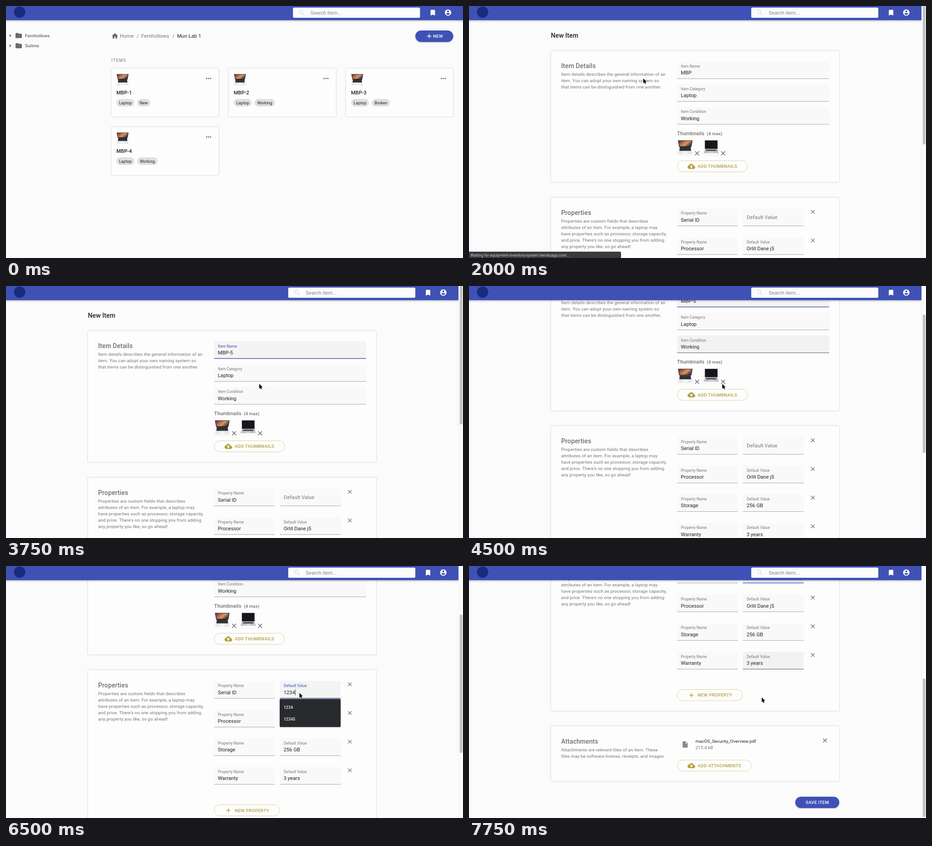
An HTML page that plays this animation: 1007 px wide and 556 px high, repeating every 8 s.

```html
<!DOCTYPE html>
<html lang="en">
<head>
<meta charset="utf-8">
<title>Equipment inventory</title>
<style>
html, body { margin: 0; width: 100%; height: 100%; overflow: hidden; background: #fbfbfb; }
svg { display: block; width: 1007px; height: 556px; font-family: Roboto, Arial, sans-serif; }
text { white-space: pre; }
.card { fill: #fdfdfd; filter: drop-shadow(0 .8px .8px rgba(0,0,0,.3)); }
.raised { fill: #3f51b5; filter: drop-shadow(0 1.2px 1.2px rgba(0,0,0,.3)); }
.bar { fill: #3f51b5; filter: drop-shadow(0 1.5px 2px rgba(0,0,0,.3)); }
.thumb { fill: #fff; filter: drop-shadow(0 .4px .7px rgba(0,0,0,.3)); }
</style>
</head>
<body>
<svg id="stage" viewBox="0 0 1007 556">
  <defs>
    <linearGradient id="dusk" x2="1" y2=".5">
      <stop offset="0" stop-color="#47374f"/><stop offset=".4" stop-color="#c4664a"/>
      <stop offset=".65" stop-color="#d99a56"/><stop offset="1" stop-color="#4a3a58"/>
    </linearGradient>
    <linearGradient id="sky" x2="1" y2="1">
      <stop offset="0" stop-color="#0b4fc0"/><stop offset=".55" stop-color="#2f8fee"/>
      <stop offset="1" stop-color="#0a3fa6"/>
    </linearGradient>
    <clipPath id="view"><rect y="31" width="997" height="525"/></clipPath>
  </defs>
  <g id="page"></g>
  <g id="header"></g>
  <g id="overlay"></g>
</svg>
<script>
const BLUE = '#3f51b5', GREY = '#757575', INK = '#212121', GOLD = '#b39f3e', ICON = '#666';
const LOOP = 8000, STEP = 250;

const ICONS = {
  bookmark: 'M17 3H7c-1.1 0-1.99.9-1.99 2L5 21l7-3 7 3V5c0-1.1-.9-2-2-2z',
  account: 'M12 2C6.48 2 2 6.48 2 12s4.48 10 10 10 10-4.48 10-10S17.52 2 12 2zm0 3c1.66 0 3 1.34 3 3s-1.34 3-3 3-3-1.34-3-3 1.34-3 3-3zm0 14.2c-2.5 0-4.71-1.28-6-3.22.03-1.99 4-3.08 6-3.08 1.99 0 5.97 1.09 6 3.08-1.29 1.94-3.5 3.22-6 3.22z',
  home: 'M10 20v-6h4v6h5v-8h3L12 3 2 12h3v8z',
  folder: 'M10 4H4c-1.1 0-1.99.9-1.99 2L2 18c0 1.1.9 2 2 2h16c1.1 0 2-.9 2-2V8c0-1.1-.9-2-2-2h-8l-2-2z',
  caret: 'M10 17l5-5-5-5v10z',
  add: 'M19 13h-6v6h-2v-6H5v-2h6V5h2v6h6v2z',
  addCircle: 'M13 7h-2v4H7v2h4v4h2v-4h4v-2h-4V7zm-1-5C6.48 2 2 6.48 2 12s4.48 10 10 10 10-4.48 10-10S17.52 2 12 2zm0 18c-4.41 0-8-3.59-8-8s3.59-8 8-8 8 3.59 8 8-3.59 8-8 8z',
  cloud: 'M19.35 10.04C18.67 6.59 15.64 4 12 4 9.11 4 6.6 5.64 5.35 8.04 2.34 8.36 0 10.91 0 14c0 3.31 2.69 6 6 6h13c2.76 0 5-2.24 5-5 0-2.64-2.05-4.78-4.65-4.96zM14 13v4h-4v-4H7l5-5 5 5h-3z',
  close: 'M19 6.41L17.59 5 12 10.59 6.41 5 5 6.41 10.59 12 5 17.59 6.41 19 12 13.41 17.59 19 19 17.59 13.41 12z',
  more: 'M6 10a2 2 0 100 4 2 2 0 000-4zm6 0a2 2 0 100 4 2 2 0 000-4zm6 0a2 2 0 100 4 2 2 0 000-4z',
  file: 'M6 2c-1.1 0-1.99.9-1.99 2L4 20c0 1.1.89 2 1.99 2H18c1.1 0 2-.9 2-2V8l-6-6H6zm7 7V3.5L18.5 9H13z',
  search: 'M15.5 14h-.79l-.28-.27C15.41 12.59 16 11.11 16 9.5 16 5.91 13.09 3 9.5 3S3 5.91 3 9.5 5.91 16 9.5 16c1.61 0 3.09-.59 4.23-1.57l.27.28v.79l5 4.99L20.49 19l-4.99-5zm-6 0C7.01 14 5 11.99 5 9.5S7.01 5 9.5 5 14 7.01 14 9.5 11.99 14 9.5 14z'
};

const rect = (x, y, w, h, attrs = '') => `<rect x="${x}" y="${y}" width="${w}" height="${h}" ${attrs}/>`;
const icon = (name, cx, cy, fill = ICON, k = 0.7) =>
  `<path d="${ICONS[name]}" fill="${fill}" transform="translate(${cx - 12 * k} ${cy - 12 * k}) scale(${k})"/>`;
const text = (s, x, y, size, fill = INK, { w = 400, ls = 0, mid = false } = {}) =>
  `<text x="${x}" y="${y}" font-size="${size}" fill="${fill}" font-weight="${w}" letter-spacing="${ls}"` +
  `${mid ? ' text-anchor="middle"' : ''}>${s}</text>`;
const card = (x, y, w, h) => rect(x, y, w, h, 'rx="2.8" class="card"');
const lines = (list, x, y, gap, ls) => list.map((s, i) => text(s, x, y + i * gap, 9.8, GREY, { ls })).join('');
const chip = (s, x, y, w) =>
  rect(x, y, w, 16.8, 'rx="8.4" fill="#e0e0e0"') + text(s, x + w / 2, y + 11.5, 9.1, INK, { mid: true });

function laptop(x, y, size, plain) {
  const screen = plain
    ? '<path d="M3 1.5H31V20H3z" fill="#16171a"/><path d="M3 20H31L33.500 30H.5z" fill="#c3c4c6"/>' +
      '<path d="M6 21.500H28L29 25H5z" fill="#55565a"/><path d="M13 26H21L21.500 29H12.500z" fill="#d8d9da"/>'
    : '<path d="M1 1.500H33L30.500 16H3.500z" fill="#222127"/><path d="M2.500 2.500H31.500L29.500 14.500H4.500z" fill="url(#dusk)"/>' +
      '<path d="M4 16H30L32.500 32H1.500z" fill="#e6e6e8"/><path d="M5 16H29L29.800 24.500H4.200z" fill="#303136"/>' +
      '<path d="M11.500 26H22.500L23 31H11z" fill="#f4f4f5"/>';
  return `<g transform="translate(${x} ${y}) scale(${size / 34})">${rect(0, 0, 34, 34.5, 'rx="2.5" class="thumb"')}${screen}</g>`;
}

function desktop(x, y) {
  return `<g transform="translate(${x} ${y})">${rect(0, 0, 34.5, 34.5, 'rx="2.5" class="thumb"')}
    <path d="M1 2L11 1V28L1 26z" fill="#1d2025"/>
    <path d="M10 3L34 1V21L10 23z" fill="#15181d"/><path d="M11.500 4.200L32.800 2.500V19.500L11.500 21.300z" fill="url(#sky)"/>
    <path d="M19 22H25L26 26H18z" fill="#30343a"/><path d="M9 26L29 27L27 31L6 29z" fill="#c9ccd1"/>
    <ellipse cx="31" cy="29.500" rx="2" ry="1.300" fill="#34373c"/></g>`;
}

function itemCard(x, y, name, state, chipW) {
  return card(x, y, 236.5, 106) + laptop(x + 11.3, y + 11, 27.5) + icon('more', x + 214.5, y + 22) +
    text(name, x + 11.3, y + 57, 11.2, INK, { w: 500 }) +
    chip('Laptop', x + 11.3, y + 67, 39.5) + chip(state, x + 57, y + 67, chipW);
}

function listPage(st) {
  const places = ['Fernhollows', 'Sulime'].map((s, i) => {
    const y = 65.2 + i * 22.4;
    return icon('caret', 9.500, y, ICON) + icon('folder', 28, y, '#6a6a6a') +
      text(s, 42, y + 3.800, 9.8, '#666', { w: 500, ls: 0.1 });
  }).join('');
  const trail = [['Home', 251], ['/', 288], ['Fernhollows', 298], ['/', 367]]
    .map(([s, x]) => text(s, x, 70.2, 11.2, GREY, { ls: 0.1 })).join('');
  return places + icon('home', 240, 66.2) + trail + text('Mun Lab 1', 377, 70.2, 11.2, INK, { ls: 0.1 }) +
    rect(902, 54, 83.500, 25.2, `rx="12.6" class="raised"${st.hot ? ' style="fill:#303f9f"' : ''}`) +
    icon('add', 932.500, 66.5, '#fff') + text('NEW', 941, 70.1, 9.8, '#fff', { w: 500, ls: 0.28 }) +
    text('ITEMS', 232, 123.2, 9.5, GREY, { ls: 1.15 }) +
    itemCard(232, 138, 'MBP-1', 'New', 29) + itemCard(490.5, 138, 'MBP-2', 'Working', 45) +
    itemCard(749, 138, 'MBP-3', 'Broken', 40) + itemCard(232, 267, 'MBP-4', 'Working', 45);
}

function templatePage() {
  const bold = { w: 500 };
  return text('Choose template', 22, 70, 14, INK, { w: 500, ls: 0.1 }) +
    rect(22.5, 88.2, 223, 112.3, `rx="2.8" fill="none" stroke="${BLUE}" stroke-width="1.4" stroke-dasharray="4.2 2.8"`) +
    icon('addCircle', 133.7, 133, BLUE) + text('No Template', 133.7, 159, 11.2, BLUE, { mid: true, ls: 0.1 }) +
    card(268, 87.5, 224.5, 113.5) + laptop(280, 99, 34) +
    text('Mossbell Pad Tem...', 279.5, 151.6, 11.2, INK, bold) + chip('Laptop', 398, 139.500, 39.5) +
    lines(['The Mossbell Pad is a line of', 'Tolvamesh portable computers int...'], 279.5, 172.3, 12.8, 0) +
    card(514.5, 87.5, 224.5, 113.5) + desktop(526, 99) +
    text('PC Template', 526, 151.6, 11.2, INK, bold) + chip('Desktop', 602, 139.500, 45) +
    lines(['A personal computer (PC) is a', 'multi-purpose computer whose si...'], 526, 172.3, 12.8, 0);
}

// Filled text field; mode is '', 'hover' or 'focus'.
function field(label, value, x, y, w, mode) {
  const focus = mode === 'focus', hover = mode === 'hover';
  const fill = hover ? '#f2f2f2' : focus ? '#f4f4f4' : '#f9f9f9';
  const line = focus ? rect(x, y + 37.2, w, 1.4, `fill="${BLUE}"`)
    : rect(x, y + 37.8, w, 0.8, `fill="${hover ? '#333' : '#8f8f8f'}"`);
  const raised = value || focus;
  const tag = raised
    ? text(label, x + 8.5, y + 13.5, 8.4, focus ? BLUE : GREY, { ls: 0.08 })
    : text(label, x + 8.5, y + 22.7, 11.2, GREY, { ls: 0.1 });
  return `<path d="M${x} ${y + 38.5}V${y + 2.8}q0 -2.800 2.800 -2.800h${w - 5.6}q2.800 0 2.800 2.800V${y + 38.5}z" fill="${fill}"/>` +
    line + tag + text(value, x + 8.3, y + 28.9, 11.2);
}

const caret = (x, y) => rect(x, y, 0.8, 13.5, 'fill="#222"');

function outlined(s, y, w, glyph) {
  return rect(458.9, y, w, 24.6, `rx="12.3" fill="none" stroke="#d2c78d" stroke-width=".8"`) +
    icon(glyph, 490, y + 12.5, GOLD) + text(s, 504, y + 15.9, 9.8, GOLD, { w: 500, ls: 0.28 });
}

const ROWS = [['Serial ID', ''], ['Processor', 'Orlit Dane j5'], ['Storage', '256 GB'], ['Warranty', '3 years']];

function formPage(st) {
  const mode = id => st.focus === id ? 'focus' : st.hover === id ? 'hover' : '';
  const head = (s, y) => text(s, 203, y, 14, '#707070', { w: 500, ls: 0.1 });
  const rows = ROWS.map(([name, value], i) => {
    const y = 446.8 + i * 63.25;
    return field('Property Name', name, 458.5, y, 133.8, '') +
      field('Default Value', i ? value : st.serial, 603.5, y, 134, mode('value' + i)) +
      icon('close', 757.6, y + 7.200, ICON, 0.62);
  }).join('');
  const menu = st.menu ? rect(603, 486.2, 134.5, 62, 'rx="2.8" fill="#292a2d"') +
    ['1234', '12345'].map((s, i) => text(s, 611.7, 508.4 + i * 25.2, 9.1, '#eee', { w: 500 })).join('') : '';
  const cursorBar = !st.caret ? '' : st.focus === 'name'
    ? caret(467 + st.name.length * 7.3, 140) : caret(612 + st.serial.length * 6.35, 465.2);

  const body = text('New Item', 180.5, 70, 14, INK, { w: 500, ls: 0.1 }) +
    card(180.5, 99, 635.5, 289.5) + head('Item Details', 137.2) +
    lines(['Item details describes the general information of an', 'item. You can adopt your own naming system so',
      'that items can be distinguished from one another.'], 203, 154.2, 14, 0.105) +
    field('Item Name', st.name, 458.5, 122, 335, mode('name')) +
    field('Item Category', 'Laptop', 458.5, 172.4, 335, mode('category')) +
    field('Item Condition', 'Working', 458.5, 222.8, 335, mode('condition')) +
    text('Thumbnails', 458.5, 284.8, 11.2, '#707070', { w: 500, ls: 0.1 }) +
    text('(4 max)', 524, 284.8, 9.8, '#707070', { w: 500, ls: 0.1 }) +
    laptop(459.5, 295, 34) + icon('close', 502.7, 325) +
    laptop(516.7, 295, 34, true) + icon('close', 560, 325) +
    outlined('ADD THUMBNAILS', 341.4, 155, 'cloud') +
    card(180.5, 422.5, 635.5, 344.5) + head('Properties', 460.9) +
    lines(['Properties are custom fields that describes', 'attributes of an item. For example, a laptop may',
      'have properties such as processor, storage capacity,', "and price. There's no one stopping you from adding",
      'any property you like, so go ahead!'], 203, 477.9, 14, 0.105) +
    rows + outlined('NEW PROPERTY', 719.8, 143.8, 'add') +
    card(180.5, 800.5, 635.5, 121.5) + head('Attachments', 839.2) +
    lines(['Attachments are relevant files of an item. These', 'files may be software license, receipts, and images.'],
      203, 856.4, 14, 0.105) +
    icon('file', 476.2, 841, '#8a8a8a') + text('macOS_Security_Overview.pdf', 499, 837, 9.8, INK, { ls: 0.07 }) +
    text('215.4 kB', 499, 851, 9.8, GREY, { ls: 0.1 }) + icon('close', 784.3, 832.2, ICON, 0.66) +
    outlined('ADD ATTACHMENTS', 875.3, 163, 'cloud') +
    rect(719, 956.2, 96.8, 25.2, 'rx="12.6" class="raised"') +
    text('SAVE ITEM', 767.5, 972.400, 9.8, '#fff', { w: 500, ls: 0.28, mid: true }) + menu + cursorBar;
  return `<g clip-path="url(#view)"><g transform="translate(0 ${-st.scroll})">${body}</g></g>`;
}

function header(st) {
  const form = st.page === 'form', dx = form ? -10.4 : 0;
  return rect(-6, -6, form ? 1003 : 1019, 37.3, 'class="bar"') +
    '<circle cx="30" cy="13.500" r="12.500" fill="#1c2a7c"/>' +
    `<g transform="translate(${dx} 0)">` + rect(632.3, 3.5, 280, 22.5, 'rx="2.8" fill="#fcfcfc"') +
    icon('search', 652, 14.5, '#dcdcdc') + text('Search item...', 671, 18.5, 11.2, '#858585') +
    icon('bookmark', 940.4, 14.8, '#fff') + icon('account', 974, 14.5, '#fff') + '</g>';
}

function overlay(st) {
  let out = '';
  if (st.page === 'form')
    out += rect(997, 0, 10, 556, 'fill="#fbfbfb"') + rect(997, 0, 0.7, 556, 'fill="#e6e6e6"') +
      rect(999.9, st.scroll * 0.555, 6, 305.5, 'rx="3" fill="#c1c1c1"');
  if (st.status)
    out += '<path d="M0 542H332.500q2.500 0 2.500 2.500V556H0z" fill="#3a3b3e"/>' +
      text('Waiting for equipment-inventory-system.herokuapp.com...', 3, 552.5, 8.5, '#c8c9cb');
  if (st.cur)
    out += `<path transform="translate(${st.cur[0]} ${st.cur[1]})" d="M0 0V10.600L2.400 8.400L4 12L5.900 11.200L4.300 7.600H7.600z"
      fill="#000" stroke="#fff" stroke-width=".8" paint-order="stroke"/>`;
  return out;
}

// Each entry changes the running state from its time on.
const SCRIPT = [
  [0, { page: 'list', cur: null, scroll: 0, name: 'MBP', serial: '' }],
  [250, { cur: [905, 150] }],
  [500, { cur: [937, 72], hot: true }],
  [1000, { page: 'template', cur: [940, 84], status: true }],
  [1250, { cur: [940, 96] }],
  [1500, { cur: [720, 132], status: false }],
  [1750, { cur: [384, 160] }],
  [2000, { page: 'form', status: true }],
  [2250, { status: false }],
  [2750, { cur: [522, 161] }],
  [3000, { cur: [521, 149], focus: 'name', caret: true }],
  [3250, { name: 'MBP-' }],
  [3500, { name: 'MBP-5' }],
  [3750, { cur: [558, 216], caret: false }],
  [4000, { scroll: 22, hover: 'condition' }],
  [4250, { scroll: 86 }],
  [4500, { scroll: 113.7 }],
  [5000, { scroll: 152, hover: '', focus: '' }],
  [5250, { scroll: 193 }],
  [5500, { cur: [612, 256], hover: 'value0' }],
  [5750, { cur: [646.5, 280] }],
  [6000, { focus: 'value0', hover: '', caret: true, menu: true }],
  [6250, { serial: '12' }],
  [6500, { serial: '1234' }],
  [6750, { menu: false, caret: false }],
  [7000, { scroll: 372, hover: 'value3' }],
  [7250, { scroll: 444 }],
  [7500, { scroll: 447.3, cur: [645, 285] }],
  [7750, { cur: [645, 290] }]
];

const PAGES = { list: listPage, template: templatePage, form: formPage };
const stateAt = t => Object.assign({}, ...SCRIPT.filter(e => e[0] <= t).map(e => e[1]));
const put = (id, html) => { document.getElementById(id).innerHTML = html; };

let shown = -1;
function draw(now) {
  const t = Math.floor((now % LOOP) / STEP) * STEP;
  if (t !== shown) {
    const st = stateAt(t);
    put('page', rect(0, 0, 1007, 556, 'fill="#fbfbfb"') + PAGES[st.page](st));
    put('header', header(st));
    put('overlay', overlay(st));
    shown = t;
  }
}
function tick() {
  draw(performance.now() - start);
  requestAnimationFrame(tick);
}
const start = performance.now();
tick();
</script>
</body>
</html>
```
